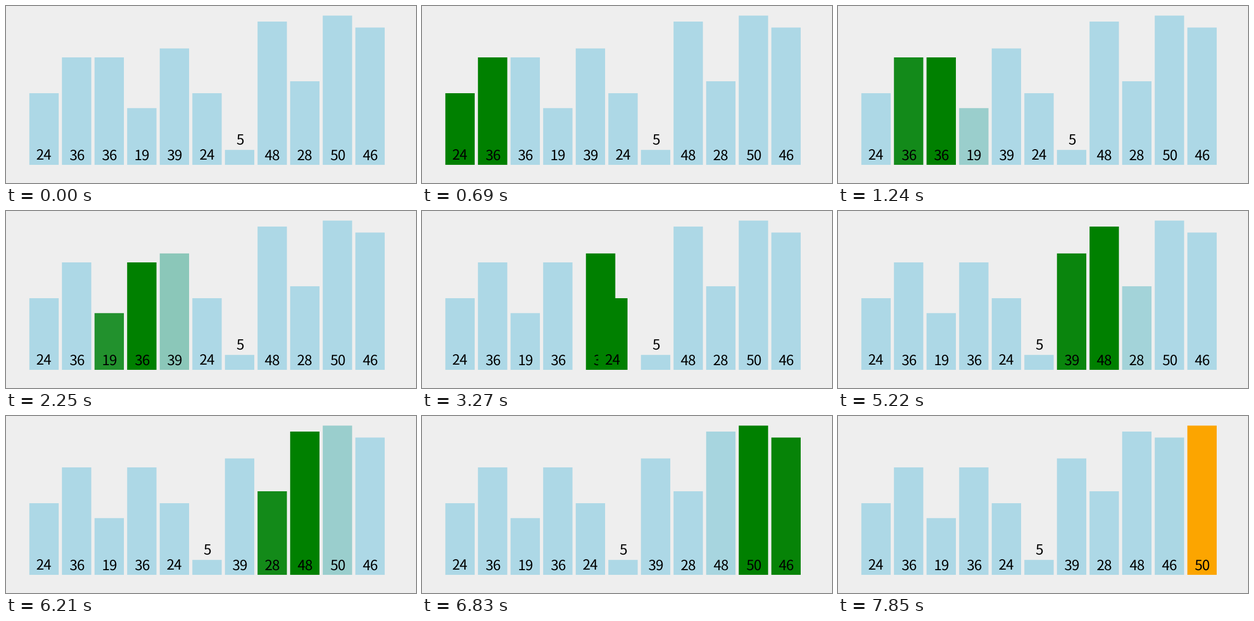
A matplotlib script for the animation above (8 s loop, 786x341 px).

```python
import numpy as np
import matplotlib.pyplot as plt
from matplotlib.animation import FuncAnimation
from matplotlib.colors import to_rgb
from matplotlib.patches import Rectangle

W, H, DPI = 786, 341, 100
LOOP, TICK = 8000, 20

# Timing in ms: one sorting move per BEAT, shown at the pace of a coarse clock
BEGIN, BEAT, FADE = 168, 497, 250
CLOCK, SHIFT = 77.65, 4.4

VALUES = [24, 36, 36, 19, 39, 24, 5, 48, 28, 50, 46]
LEFT, PITCH, BAR_W = 44.75, 62.5, 56.25
BASE, UNIT = 306, 5.75
FONT_PX, LABEL_GAP = 27, 9.5

IDLE, ACTIVE, DONE = (np.array(to_rgb(c)) for c in ("lightblue", "green", "orange"))


def pose(order, lit=(), done=None):
    """Slot and colour of every bar for one resting state."""
    slots = np.argsort(order).astype(float)
    colors = np.tile(IDLE, (len(order), 1))
    colors[list(lit)] = ACTIVE
    if done is not None:
        colors[done] = DONE
    return slots, colors


def sort_pass():
    """Resting states of the first pass of a bubble sort."""
    order = list(range(len(VALUES)))
    poses = [pose(order)]
    for i in range(len(order) - 1):
        pair = order[i:i + 2]
        poses.append(pose(order, pair))
        if VALUES[pair[0]] > VALUES[pair[1]]:
            order[i:i + 2] = pair[::-1]
            poses.append(pose(order, pair))
    poses.append(pose(order, done=order[-1]))
    return poses


def ease(t):
    """Cubic in and out."""
    t = min(max(t, 0), 1)
    return 4 * t**3 if t < 0.5 else 1 - 4 * (1 - t)**3


def state(t):
    held = (t + SHIFT) // CLOCK * CLOCK - SHIFT
    move, since = divmod(held - BEGIN, BEAT)
    if move < 0:
        return POSES[0]
    k = min(int(move), len(POSES) - 2)
    u = ease(since / FADE)
    return [a + (b - a) * u for a, b in zip(POSES[k], POSES[k + 1])]


POSES = sort_pass()

plt.rcParams["text.hinting"] = "none"
fig = plt.figure(figsize=(W / DPI, H / DPI), dpi=DPI, facecolor="#eeeeee")
ax = fig.add_axes([0, 0, 1, 1])
ax.set(xlim=(0, W), ylim=(H, 0))
ax.axis("off")

bars, labels = [], []
for i, value in enumerate(VALUES):
    height = value * UNIT
    top = BASE - height
    bar = Rectangle((0, top), BAR_W, height, lw=0, zorder=2 * i, snap=False)
    bars.append(ax.add_patch(bar))
    # A label that does not fit inside its bar stands above it
    floor = BASE if height > FONT_PX + LABEL_GAP else top
    labels.append(ax.text(0, floor - LABEL_GAP, str(value), ha="center", va="baseline",
                          family="Noto Sans CJK JP", fontsize=FONT_PX * 72 / DPI,
                          color="black", zorder=2 * i + 1))


def draw(n):
    slots, colors = state((n + 0.5) * TICK)
    for bar, label, slot, color in zip(bars, labels, slots, colors):
        x = LEFT + PITCH * slot
        bar.set_x(x)
        bar.set_facecolor(color)
        label.set_x(x + (BAR_W + 1) / 2)
    return bars + labels


anim = FuncAnimation(fig, draw, frames=LOOP // TICK, interval=TICK,
                     repeat=True, repeat_delay=0, blit=False)
plt.show()
```
